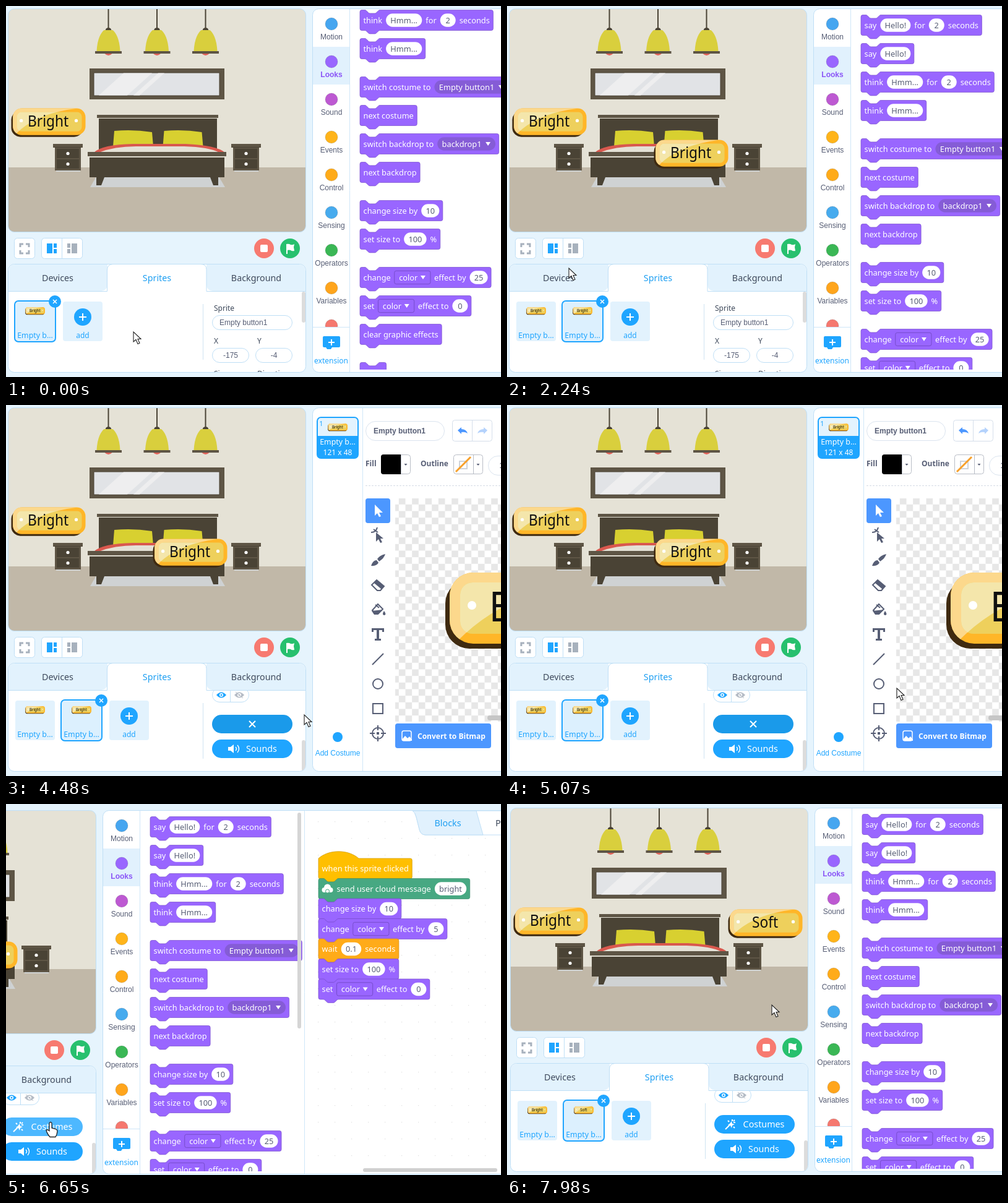
Write an HTML page with a canvas that moves like this. It is 800 by 600 pixels and loops after 8000 ms.

```html
<!DOCTYPE html>
<html lang="en">
<head>
<meta charset="utf-8">
<title>Block editor</title>
<style>
html, body { margin: 0; width: 100%; height: 100%; overflow: hidden; background: #e6f4fd }
canvas { display: block }
</style>
</head>
<body>
<canvas id="stage" width="800" height="600"></canvas>
<script>
const c = document.getElementById('stage').getContext('2d');
const BLUE = '#1fa5ff', PAINT = '#4c97ff', EDGE = '#bfdff6', PALE = '#e2f2fd', INK = '#3f4a5c', SLATE = '#575e75', PURPLE = '#9966ff';
const WOOD = '#5e5545', DARK = '#4a4335';
const noto = (size, weight = 400) => `${weight} ${size}px "Noto Sans", sans-serif`;
const arial = (size, weight = 400) => `${weight} ${size}px "Liberation Sans", Arial, sans-serif`;

// Screen capture clock: runs of evenly spaced updates [from, to, count].
const beats = [[0, 0, 1], [80, 550, 6], [970, 1130, 3], [1320, 2060, 9], [2150, 2900, 9], [3000, 3270, 4],
  [3460, 3550, 2], [3670, 3670, 1], [3920, 4670, 10], [4760, 5070, 4], [5160, 5240, 2], [5390, 5450, 2],
  [5600, 6370, 9], [6460, 6460, 1], [6650, 6650, 1], [6960, 6960, 1], [7320, 7530, 3], [7840, 7980, 3]]
  .flatMap(([a, b, n]) => Array.from({ length: n }, (_, i) => a + (b - a) * i / Math.max(1, n - 1)));

const cameraTrack = [[5070, 0, 0], [5450, -339, 6], [6959, -339, 6], [6960, 2, 2]];
const cursorTrack = [[0, 206, 527], [550, 64, 515], [970, 64, 515], [1320, 80, 493], [2060, 100, 424], [2150, 100, 424],
  [2900, 366, 545], [3270, 399, 509], [4170, 404, 512], [4670, 560, 490], [5070, 630, 458], [5240, 760, 400],
  [5450, 860, 369], [6370, 398, 514], [6650, 411, 509], [6960, 411, 509], [7530, 297, 240], [7700, 297, 240],
  [7910, 415, 193], [7980, 426, 323]];
const scrollTrack = [[3270, 0], [3460, 95], [3550, 177], [3670, 203]];
const dragTrack = [[7530, 237.5, 216.5], [7910, 355.5, 168.5]];

function track(keys, t) {
  const i = keys.findIndex(k => k[0] > t);
  if (i < 0) return keys.at(-1).slice(1);
  if (i === 0) return keys[0].slice(1);
  const [a, b] = [keys[i - 1], keys[i]], u = (t - a[0]) / (b[0] - a[0]);
  return a.slice(1).map((v, j) => v + (b[j + 1] - v) * u);
}

function paint(shape, fill, stroke, width = 1) {
  if (fill) { c.fillStyle = fill; c.fill(shape); }
  if (stroke) { c.strokeStyle = stroke; c.lineWidth = width; c.stroke(shape); }
}
function rounded(x, y, w, h, r) {
  const p = new Path2D();
  p.roundRect(x, y, w, h, r);
  return p;
}
const box = (x, y, w, h, r, fill, stroke, width) => paint(rounded(x, y, w, h, r), fill, stroke, width);
const disc = (x, y, r, fill, stroke, width) => box(x - r, y - r, 2 * r, 2 * r, r, fill, stroke, width);
function at(x, y, draw) {
  c.save();
  c.translate(x, y);
  draw();
  c.restore();
}
const path = (d, fill, stroke, width, x = 0, y = 0) => at(x, y, () => paint(new Path2D(d), fill, stroke, width));
function clipped(x, y, w, h, r, draw) {
  c.save();
  c.clip(rounded(x, y, w, h, r));
  draw();
  c.restore();
}
function dashed(d) {
  c.setLineDash([3, 2]);
  path(d, null, '#d5dbe5');
  c.setLineDash([]);
}
function text(s, x, y, color, font = noto(12), align = 'center') {
  c.font = font;
  c.fillStyle = color;
  c.textAlign = align;
  c.fillText(s, x, y);
}

function button(x, y, scale, label) {
  const gloss = 'M0 125L14 117Q100 22 285 0H0z';
  c.save();
  c.translate(x, y);
  c.scale(scale, scale);
  box(0, 11, 310, 112, 39, '#3f2a10');
  for (const [args, base, light] of [[[7, 0, 313, 115, 38], '#ffb628', '#fcd88c'], [[24, 16, 280, 83, 20], '#eed05c', '#f4e6ab']]) {
    box(...args, base);
    clipped(...args, () => path(gloss, light));
  }
  disc(43, 53, 7, '#fff');
  disc(280, 53, 7, '#fff');
  c.translate(159, 79);
  c.scale(.89, 1);
  text(label, 0, 0, '#111', noto(68));
  c.restore();
}

function lamp() {
  path('M0 0V37', null, DARK, 2);
  path('M-5 41q0-6 5-6q5 0 5 6z', DARK);
  path('M-19 73C-18 53-12 43-7 39H7C12 43 18 53 19 73z', '#d9cf3d');
  path('M-6 77q6 6 12 0z', '#e0625a');
  box(-21.5, 73, 43, 4, 0, WOOD);
}
function nightstand() {
  box(5, 263, 39, 5, 0, '#d0d3d3');
  box(3, 229, 42, 37, 0, WOOD);
  box(0, 223, 48, 6, 0, WOOD);
  path('M1 228.5H47', null, DARK);
  for (const y of [231, 248]) {
    box(6, y, 36, 15, 0, DARK);
    disc(24, y + 7.5, 2.6, '#fff');
  }
}
function bedroom(second, label) {
  clipped(3.5, 4.5, 481, 361, 10, () => {
    box(0, 0, 490, 262, 0, '#e5e2d6');
    box(0, 261, 490, 110, 0, '#c1b8a8');
    for (const x of [165.5, 244, 322.5]) at(x, 0, lamp);
    box(135, 101, 218, 50, 0, WOOD);
    box(142, 108, 203, 37, 0, '#e1e3e6', DARK);
    path('M150 144.5L190 108.5H236L196 144.5zM206 144.5L246 108.5H256L216 144.5z', '#eeeeef');
    at(76, 0, nightstand);
    at(364, 0, nightstand);
    path('M146 276H344L354 293H136z', '#cfd2d3');
    box(147, 176, 196, 5, 0, WOOD);
    box(150, 182, 191, 56, 0, DARK);
    for (const x of [173, 253.5]) path('M2 1Q32-2 63 3L65 26H0z', '#d8d030', null, 1, x, 201);
    path('M142 237Q155 224 205 223H290Q340 225 354 237z', '#d9584e');
    path('M150 237Q175 227 210 227H288Q328 228 345 237z', '#e4e1d6');
    box(132, 236, 224, 7, 0, WOOD);
    path('M135 244H353', null, '#d8d4c8');
    box(135, 245, 218, 32, 0, DARK);
    path('M146 277h13l-5 13h-8zM343 277h-13l5 13h8z', DARK);
    button(8.5, 165.5, .375, 'Bright');
    if (second) button(...second, .375, label);
  });
  box(3.5, 4.5, 481, 361, 10, null, EDGE);
}

function controls() {
  box(13.5, 375.5, 33, 33, 5, '#fff', EDGE);
  path('M23 390v-5h5M32 385h5v5M37 395v5h-5M28 400h-5v-5', null, '#a7b1bd', 3);
  box(57.5, 375.5, 66, 33, 5, '#fff', EDGE);
  path('M90.5 376v33', null, EDGE);
  path('M66 384h9v16h-9zM77 384h5v7h-5zM77 393h5v7h-5z', BLUE);
  path('M99 384h5v7h-5zM99 393h5v7h-5zM106 384h9v16h-9z', '#a7b1bd');
  disc(417, 392, 16, '#f77a70');
  box(411, 386, 12, 12, 2, '#fff');
  disc(459, 392, 16, '#27c06e');
  path('M453 385q4-1 7 1q3 1 6-1l-1 5 1 6q-4 1-6-1q-3-1-5 0v6h-2z', '#fff');
}

function tile(x, label, selected) {
  if (selected) {
    box(x - 33, 477, 66, 66, 6, '#dcf0fe', BLUE, 2);
    disc(x + 32, 478, 10, BLUE);
    path('M-3-3L3 3M3-3L-3 3', null, '#fff', 1.5, x + 32, 478);
  } else box(x - 32, 478, 64, 64, 4, PALE);
  button(x - 16, 487, .1, label);
  text('Empty b...', x, 537, BLUE, noto(12.4));
}
function field(label, value, x, y, w) {
  text(label, x + 3, y, INK, noto(12), 'left');
  box(x + .5, y + 7.5, w - 1, 23, 12, '#fff', EDGE);
  const wide = w > 80;
  text(value, wide ? x + 12 : x + w / 2, y + 23, SLATE, arial(12), wide ? 'left' : 'center');
}
function eye(x, y, color) {
  path('M-8 0Q0-9 8 0Q0 9-8 0z', color, null, 1, x, y);
  disc(x, y, 3, '#fff');
  disc(x, y, 1.5, color);
}
function properties(scroll, editing, hover) {
  at(0, -scroll, () => {
    field('Sprite', 'Empty button1', 333, 493, 130);
    field('X', '-175', 333, 546, 60);
    field('Y', '-4', 403, 546, 60);
    field('Size', '100', 333, 599, 60);
    field('Direction', '90', 403, 599, 60);
    text('Show', 336, 652, INK, noto(12), 'left');
    box(333.5, 660.5, 59, 23, 12, '#fff', EDGE);
    path('M362.5 661v23', null, EDGE);
    eye(348, 672, BLUE);
    eye(377, 672, '#b5bcc6');
    path('M371 667l12 10', null, '#b5bcc6');
    box(333, 704, 130, 30, 15, editing ? '#1a9aea' : hover ? '#4db8ff' : BLUE);
    if (editing) path('M-5-5L5 5M5-5L-5 5', null, '#fff', 2, 398, 719);
    else {
      path('M-8 8L2-2M3-8v3M8-3h-3M7-7l-2 2M-4-6l2 2M5 4l2 2', null, '#fff', 2, 359, 719);
      path('M2-5l1 4 4 1-4 2-1 4-2-4-4-1 3-2z', '#fff', null, 1, 359, 719);
      text('Costumes', 413, 724, '#fff', noto(14.3));
    }
    box(333, 744, 130, 30, 15, BLUE);
    path('M-8-3h4l5-4v14l-5-4h-4z', '#fff', null, 1, 367, 759);
    path('M4-3q3 3 0 6M7-6q5 6 0 12', null, '#fff', 1.4, 367, 759);
    text('Sounds', 413, 764, '#fff', noto(14.3));
  });
}
function spritePanel(s) {
  box(3.5, 417.5, 481, 175, 10, '#fff', EDGE);
  box(4, 418, 160, 43, [10, 0, 10, 0], PALE);
  box(324, 418, 160, 43, [0, 10, 0, 10], PALE);
  path('M4 461.5H163.5V427q0-9 9-9.5H315q9 0 9 9V461.5H484', null, EDGE);
  ['Devices', 'Sprites', 'Background'].forEach((name, i) =>
    text(name, 83.5 + 160.5 * i, 445, i === 1 ? '#1e9ff2' : INK, noto(14.3)));
  tile(47, 'Bright', !s.copied);
  if (s.copied) tile(122, s.label, true);
  const add = s.copied ? 199 : 124;
  box(add - 32, 478, 64, 64, 4, PALE);
  disc(add, 503, 14, BLUE);
  path('M-6 0h12M0-6v12', null, '#fff', 2, add, 503);
  text('add', add, 537, BLUE);
  path('M318.5 482v90', null, '#cfe3f2');
  clipped(320, 462, 164, 130, [0, 0, 9, 0], () => {
    properties(s.scroll, s.editing, s.hover);
    box(478, 462 + s.scroll * 80 / 203, 6, 50, 3, '#dcdcdc');
  });
}

function contextMenu(y) {
  c.save();
  c.shadowColor = '#0004';
  c.shadowBlur = 5;
  box(64, 398, 128, 119, 2, '#fff');
  c.restore();
  ['duplicate', 'Export', 'delete'].forEach((name, i) => {
    const top = 402 + 36.5 * i, over = y >= top && y < top + 36.5, danger = i === 2;
    if (over) box(64, top, 128, 37, 0, danger ? '#ffa5a5' : PALE);
    text(name, 76, 426 + 36 * i, over && danger ? '#a9c9ea' : BLUE, noto(14), 'left');
  });
}

// Block labels: (value), [menu], <round menu>, * cloud icon.
const notch = s => `c${1.3 * s} 0 ${2 * s} .7 ${2.7 * s} 1.4l${2.7 * s} 2.6c${.7 * s} .7 ${1.4 * s} 1.4 ${2.7 * s} 1.4h${8 * s}` +
  `c${1.3 * s} 0 ${2 * s}-.7 ${2.7 * s}-1.4l${2.7 * s}-2.6c${.7 * s}-.7 ${1.4 * s}-1.4 ${2.7 * s}-1.4`;
function block(label, x, y, fill = PURPLE, edge = '#774dcb', hat = false) {
  const font = noto(12.8, 500);
  c.font = font;
  let pen = 5.5;
  const parts = label.match(/\*|\(.*?\)|\[.*?\]|<.*?>|[^*([<]+/g).map(raw => {
    const kind = '([<*'.includes(raw[0]) ? raw[0] : '';
    const s = kind ? raw.slice(1, -1) : raw.trim();
    const tw = c.measureText(s).width;
    const w = { '(': Math.max(25, tw + 14.5), '[': tw + 28, '<': tw + 30, '*': 18, '': tw }[kind];
    const part = { kind, s, w, x: pen };
    pen += w + 6;
    return part;
  });
  const w = pen - .5;
  at(x, y, () => {
    const top = hat ? 'M0-16.5c17-15 48-15 65 0' : `M0-13.5q0-3 3-3h5${notch(1)}`;
    path(`${top}H${w - 3}q3 0 3 3v27q0 3-3 3H32.2${notch(-1)}h-5q-3 0-3-3z`, fill, edge, .7);
    for (const p of parts) {
      if (p.kind === '*') {
        disc(p.x + 4, 2, 4, '#fff');
        disc(p.x + 9, -2, 5.5, '#fff');
        disc(p.x + 14, 2, 4, '#fff');
        disc(p.x + 9, 4, 3, '#fff', fill);
      } else if (p.kind === '(') {
        box(p.x, -10.7, p.w, 21.4, 10.7, '#fff');
        text(p.s, p.x + p.w / 2, 4.5, SLATE, font);
      } else {
        if (p.kind === '[') box(p.x, -10.7, p.w, 21.4, 3, null, edge);
        if (p.kind === '<') box(p.x, -10.7, p.w, 21.4, 10.7, '#855cd6');
        text(p.s, p.x + (p.kind ? 7.4 : 0), 4.5, '#fff', font, 'left');
        if (p.kind) path('M-4-3h8l-4 6z', '#fff', null, 1, p.x + p.w - 12, 0);
      }
    }
  });
}

const categories = [['Motion', '#46a6f0'], ['Looks', PURPLE], ['Sound', '#bd59d2'], ['Events', '#ffb41a'], ['Control', '#ffab19'],
  ['Sensing', '#47abee'], ['Operators', '#3ab755'], ['Variables', '#ffa51c'], ['', '#f5786f']];
const palette = [['say (Hello!) for (2) seconds', 31], ['say (Hello!)', 77], ['think (Hmm...) for (2) seconds', 123], ['think (Hmm...)', 169],
  ['switch costume to <Empty button1>', 231], ['next costume', 277], ['switch backdrop to <backdrop1>', 323], ['next backdrop', 369],
  ['change size by (10)', 431], ['set size to (100) %', 477], ['change [color] effect by (25)', 539], ['set [color] effect to (0)', 585],
  ['clear graphic effects', 631], ['show', 693]];
const script = [['* send user cloud message (bright)', '#47a882', '#388a69'], ['change size by (10)'], ['change [color] effect by (5)'],
  ['wait (0.1) seconds', '#ffab19', '#cf8b17'], ['set size to (100) %'], ['set [color] effect to (0)']];

function blocksView(scroll) {
  box(496, 66, 59, 61, 0, '#e1f1fd');
  categories.forEach(([name, color], i) => {
    disc(526, 29 + 61 * i, 10, color, '#0002');
    text(name, 526, 54 + 61 * i, i === 1 ? '#8a55f7' : SLATE, arial(12, i === 1 ? 700 : 400));
  });
  box(496, 519, 59, 72, [0, 0, 0, 9], '#fff');
  path('M496 519.5h59M555.5 5v587', null, '#cfe6f8');
  path('M514 534h24q2 0 2 2v14q0 2-2 2h-11l-2 3h-6l-2-3h-3q-2 0-2-2v-14q0-2 2-2z', BLUE);
  path('M521 544h10M526 539v10', null, '#fff', 2);
  text('extension', 525.5, 578, BLUE);
  clipped(556, 5, 265, 583, 0, () => {
    for (const [label, y] of palette) block(label, 572, y - scroll);
    box(810, 8 + scroll * .6, 6, 349, 3, '#d5d5d5');
  });
  at(339, -6, workspace);
}
function workspace() {
  path('M482.5 11V598', null, '#cfe6f8');
  for (let x = 504; x < 800; x += 27) for (let y = 28; y < 590; y += 27) box(x, y, 1.2, 1.2, 0, '#dfdfdf');
  path('M657 11q4 2 6 10l5 20q2 9 10 9H900V11z', '#fff', EDGE);
  path('M657 11q4 2 6 10l5 20q2 9 10 9H771L760 11z', '#e1f1fd', EDGE);
  text('Blocks', 714, 35.5, '#1e9ff2', noto(14.3));
  text('Python', 791, 35.5, INK, noto(14.3), 'left');
  block('when this sprite clicked', 505, 104.5, '#ffbf00', '#cc9900', true);
  script.forEach(([label, fill, edge], i) => block(label, 505, 137 + 32.5 * i, fill, edge));
  box(577, 589, 217, 6, 3, '#d0d0d0');
}

const arrow = 'M-5-10V8l4-4 3 6 3-1-3-6h6z';
const toolIcons = [['M-3-5V10l4-4 3 6 3-1-3-6h5z', 'M-11-5Q-3-5-1-13M-7-10l7 5'],
  ['M12-10q-9 2-13 8l3 4q8-5 10-12zM-2 0q-6 0-9 9q9 1 12-5z'], ['M-2-8L10 2L6 7L-6-3z', 'M-2-8L10 2L4 9h-5L-10 0z'],
  ['M-10 2l18-2-8 8h-6zM10 2q5 7 0 7q-4-1 0-7', 'M-9 1L0-9 8-1 0 7h-4zM-4-8l6 5'], ['M-10-10H10v6H7v-3H2V7h3v3H-5V7h3V-7H-7v3H-10z'],
  ['', 'M-9 9L9-9'], ['', 'M-8 0a8 8 0 1 0 16 0a8 8 0 1 0-16 0'], ['', 'M-8-8H8V8H-8z'],
  ['M-2-2h4v4h-4z', 'M-9 0a9 9 0 1 0 18 0a9 9 0 1 0-18 0M-13 0h8M5 0h8M0-13v8M0 5v8']];
const actions = [['Group', 483, 39, 0, 'M-9-9h4v4h-4zM5-9h4v4h-4zM-9 5h4v4h-4zM5 5h4v4h-4zM-5-5h7v7h-7zM3-2h3v8h-8v-3h5z'],
  ['Ungroup', 534, 39, 0, 'M-9-9h4v4h-4zM1-9h4v4h-4zM-9 1h4v4h-4zM-5-5h7v7h-7zM3-2h3v8h-8v-3h5zM6 6h4v4h-4z'],
  ['Forward', 602, 39, 0, 'M0-9l5 6h-3v7h-4v-7h-3zM-10 1h6v2h-6zM4 1h6v2h-6z'],
  ['Backward', 655, 39, 1, 'M0 9l5-6h-3v-11h-4v11h-3zM-10 0h6v2h-6zM4 0h6v2h-6z'],
  ['Copy', 541, 96, 1, 'M-8-9h11l5 5v13h-16zM-1-3v3h-3v2h3v3h2v-3h3v-2h-3v-3z'],
  ['Paste', 589, 96, 0, 'M-7-8h4v-2h6v2h4v17h-14zM-1-2v4h-3l4 4 4-4h-3v-4z'],
  ['Delete', 657, 96, 1, 'M-8-7h5v-2h6v2h5v2h-16zM-7-4h14l-1 13h-12z'],
  ['Flip Horizontal', 743, 96, 1, 'M-10-6l7 6-7 6zM10-6l-7 6 7 6zM-1-9h2v4h-2zM-1-2h2v4h-2zM-1 5h2v4h-2z'],
  ['Flip Vertical', 818, 96, 1, 'M-6-10l6 7 6-7zM-6 10l6-7 6 7z']];

function checkerboard(x, y) {
  const cell = 32 / 3;
  c.fillStyle = '#e7e7e7';
  for (let i = -23; i < 23; i++) for (let j = -17; j < 17; j++)
    if ((i + j) % 2) c.fillRect(x + i * cell, y + j * cell, cell, cell);
}
function paintEditor(label, selected) {
  path('M237.5 11V598', null, '#cfe6f8');
  box(164, 26, 66, 66, 6, '#e3f3fe', BLUE, 2);
  box(164, 56, 66, 36, [0, 0, 5, 5], BLUE);
  text('1', 170.5, 40, BLUE, noto(11));
  button(181, 36, .1, label);
  text('Empty b...', 197, 70, '#fff', noto(12.4, 500));
  text('121 x 48', 197, 87, '#fff', noto(12, 500));
  disc(197, 543, 8, BLUE);
  text('Add Costume', 197, 573, BLUE, arial(12));

  box(242.5, 32.5, 127, 31, 16, '#fff', '#dbe4ef');
  text('Empty button1', 255, 52, SLATE, arial(12, 700), 'left');
  box(382.5, 30.5, 64, 34, 4, '#fff', '#d5deea');
  path('M414.5 31v34', null, '#d5deea');
  path('M-8-1l6-5v3q8 0 10 7q-4-3-10-2v3z', PAINT, null, 1, 399, 48);
  path('M8-1l-6-5v3q-8 0-10 7q4-3 10-2v3z', '#b4d2fc', null, 1, 431, 48);
  for (const [name, x, y, on, icon] of actions) {
    path(icon, on ? PAINT : '#b4d2fc', null, 1, x, y);
    text(name, x, y + 25, on ? SLATE : '#b5b9c4', noto(10));
  }
  dashed('M570 23v49M691.5 23v49M508.5 82v44M625.5 82v44M694.5 82v44M242 136.5H850');
  box(700.5, 29.5, 68, 37, 4, '#fff', '#dbe4ef');
  text('More', 709, 53, PAINT, noto(14.4), 'left');
  path('M-5-3h10l-5 6z', PAINT, null, 1, 756, 48);

  text('Fill', 242, 105, SLATE, noto(12, 700), 'left');
  text('Outline', 331, 105, SLATE, noto(12, 700), 'left');
  for (const x of [267, 384]) {
    box(x + .5, 86.5, 47, 31, 4, '#fff', '#b8bdc6');
    path('M-2.5-1h5l-2.5 3z', SLATE, null, 1, x + 40, 102);
    path(`M${x + 32}.5 87v31`, null, '#b8bdc6');
  }
  box(267, 86, 32, 32, [4, 0, 0, 4], '#000');
  path('M394 97h12v12h-12z', null, '#d0d4da', 2);
  path('M388 114l24-24', null, '#f7a02b', 3);
  box(440.5, 88.5, 59, 31, 16, '#fff', '#dbe4ef');
  text('1', 462, 108, SLATE, arial(12, 700));

  box(242, 157, 40, 40, 4, PAINT);
  path(arrow, '#fff', null, 1, 262, 177);
  toolIcons.forEach(([fill, line], i) => {
    if (fill) path(fill, SLATE, null, 1, 262, 217 + 40 * i);
    if (line) path(line, null, SLATE, 2, 262, 217 + 40 * i);
  });

  clipped(290, 157, 481, 361, 0, () => {
    checkerboard(530.5, 337.5);
    button(371, 277, 1, label);
    if (selected) selection();
    box(439, 508, 175, 8, 4, '#c6c6c6');
    box(761, 268, 8, 131, 4, '#c6c6c6');
  });
  box(290, 521, 155, 40, 4, PAINT);
  box(301, 533, 15, 16, 3, null, '#fff', 1.5);
  path('M301 547l5-6 4 4 3-3 4 5v2h-16z', '#fff');
  text('Convert to Bitmap', 326, 546, '#fff', noto(12, 700), 'left');
  box(668.5, 521.5, 97, 34, 4, '#fff', '#d5deea');
  path('M701.5 522v34M733.5 522v34', null, '#d5deea');
  for (const x of [685, 749]) {
    disc(x, 539, 5.5, null, SLATE, 1.4);
    path('M-2.5 0h5M4 4l4 4' + (x > 700 ? 'M0-2.5v5' : ''), null, SLATE, 1.4, x, 539);
  }
  path('M713 537h8M713 542h8', null, SLATE, 1.6);
}
function selection() {
  box(395, 293, 280, 83, 20, null, '#2e9be0');
  box(473.5, 296, 113, 80, 0, null, '#1b9ce6', 2.5);
  for (const x of [473.5, 530, 586.5]) for (const y of [296, 336, 376])
    if (x !== 530 || y !== 336) disc(x, y, 4.5, '#1b8fd6');
  path('M521 392q9 7 18 0M524 390l-4 2 1 5M536 390l4 2-1 5', null, '#1b8fd6', 3);
}

function cursor([x, y], hand) {
  if (hand) path('M-2 1q2-3 4 0v8l6 1.5q3 1 3 4l-1 5q-1 2-2 4h-9q-5-6-6-11q2-2 5 1z', '#fff', '#222', 1.3, x, y);
  else path('M0 0V16l4-3.5 3 7 3-1.3-3-6.7h5z', '#fff', '#222', 1.1, x, y);
}

function render(now) {
  const time = now % 8000;
  const t = beats.findLast(b => b <= time) ?? 0;
  const pointer = track(cursorTrack, t);
  const hand = t >= 460 && t < 2150 || t >= 3670 && t < 4300 || t >= 6370 && t < 7320;
  const copied = t >= 2150, editing = t >= 4050 && t < 6600, label = t >= 5390 ? 'Soft' : 'Bright';
  c.fillStyle = '#e6f4fd';
  c.fillRect(0, 0, 800, 600);
  at(...track(cameraTrack, t), () => {
    bedroom(copied && track(dragTrack, t), label);
    controls();
    spritePanel({ copied, editing, label, scroll: track(scrollTrack, t)[0], hover: hand && t > 3600 });
    box(495.5, 4.5, 800, 588, 10, '#fff', EDGE);
    if (editing) at(339, -6, () => paintEditor(label, t >= 5390 && t < 5700));
    else blocksView(copied ? 0 : 100);
    if (t >= 970 && t < 2150) contextMenu(pointer[1]);
    cursor(pointer, hand);
  });
  requestAnimationFrame(render);
}
requestAnimationFrame(render);
</script>
</body>
</html>
```
